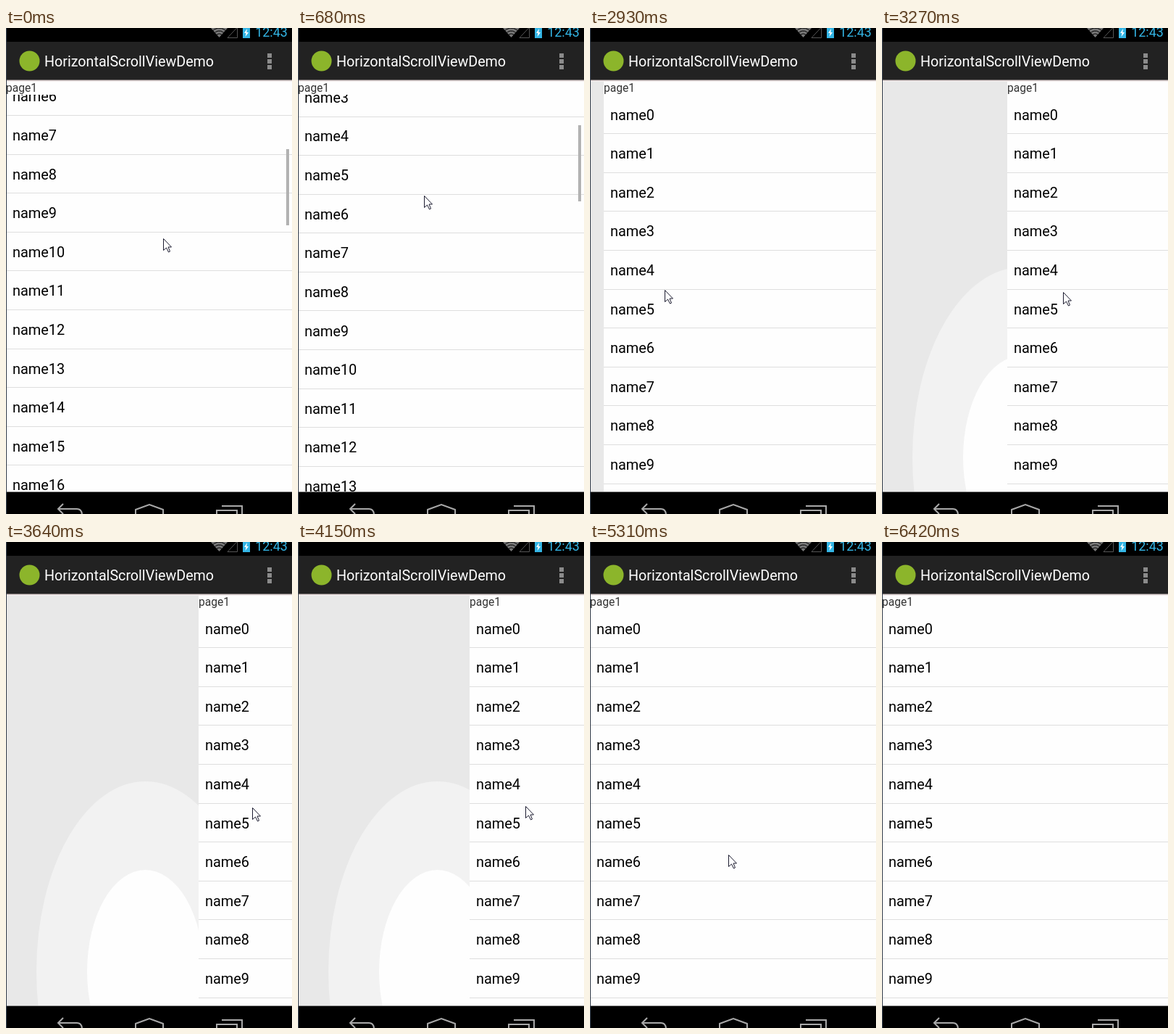
An HTML page with a canvas for the animation above (6.48 s loop, 395x670 px).

```html
<!DOCTYPE html>
<html lang="en">
<head>
<meta charset="utf-8">
<title>HorizontalScrollViewDemo</title>
<style>
html, body { margin: 0; width: 100%; height: 100%; overflow: hidden; background: #000; }
canvas { display: block; }
</style>
</head>
<body>
<canvas id="stage" width="395" height="670"></canvas>
<script>
const ctx = document.getElementById('stage').getContext('2d');
const W = 395, H = 670, LOOP = 6480;
const TOP = 72, LIST = 92, BOTTOM = 639, ROW = 53.6;
const RELEASE = 4120;

// Hand movements: start, end, x, y
const moves = [
  [30, 300, 200, 400], [340, 680, 174, 231],
  [750, 1200, 186, 412], [1350, 1570, 186, 272],
  [1630, 1970, 65, 415], [2000, 2400, 306, 94], [2400, 2640, 75, 360],
  [2880, 3900, 358, 366], [RELEASE, 4400, 148, 355], [4500, 4740, 153, 356],
  [4920, 5010, 161, 379], [5250, 5900, 328, 670]
];

const lerp = (a, b, u) => a + (b - a) * u;
const progress = (t, t0, t1) => Math.min(1, Math.max(0, (t - t0) / (t1 - t0)));
const ease = (t, t0, t1) => 1 - (1 - progress(t, t0, t1)) ** 2;

function pointer(t) {
  let x = 217, y = 290;
  for (const [t0, t1, toX, toY] of moves) {
    const u = ease(t, t0, t1);
    x = lerp(x, toX, u);
    y = lerp(y, toY, u);
  }
  return [x, y];
}

// Two flings take the list back to its first row
function scroll(t) {
  return lerp(lerp(346.8, 184.5, ease(t, 30, 680)), 0, ease(t, 750, 1160));
}

// The page follows the drag, then slides shut on release
function drawer(t) {
  if (t < 2880) return 0;
  const [x] = pointer(Math.min(t, RELEASE));
  const open = Math.max(0, (x - 84) * 1.042);
  return Math.round(lerp(open, 0, ease(t, RELEASE, RELEASE + 352)));
}

function rect(x, y, w, h, color) {
  ctx.fillStyle = color;
  ctx.fillRect(x, y, w, h);
}

function text(str, x, y, size, color) {
  ctx.font = size + 'px Roboto, sans-serif';
  ctx.fillStyle = color;
  ctx.fillText(str, x, y);
}

function shape(d, fill, stroke, width = 1) {
  const p = new Path2D(d);
  if (fill) {
    ctx.fillStyle = fill;
    ctx.fill(p);
  }
  if (stroke) {
    ctx.strokeStyle = stroke;
    ctx.lineWidth = width;
    ctx.stroke(p);
  }
}

function ellipse(x, y, rx, ry, color) {
  ctx.beginPath();
  ctx.ellipse(x, y, rx, ry, 0, 0, 7);
  ctx.fillStyle = color;
  ctx.fill();
}

function clipped(y, draw) {
  ctx.save();
  ctx.beginPath();
  ctx.rect(0, y, W, BOTTOM - y);
  ctx.clip();
  draw();
  ctx.restore();
}

function backdrop() {
  rect(0, TOP, W, BOTTOM - TOP, '#e8e8e8');
  clipped(TOP, () => {
    ellipse(192.5, 592, 150.5, 262, '#f2f2f2');
    ellipse(192.5, 592, 80.5, 140, '#fefefe');
  });
}

function page(x, top) {
  rect(x, TOP, W - x, BOTTOM - TOP, '#fefefe');
  text('page1', x, 88, 15.6, '#333');
  clipped(LIST, () => {
    const first = Math.floor(top / ROW);
    for (let i = first; i < first + 12; i++) {
      const y = LIST + i * ROW - top;
      text('name' + i, x + 9, Math.round(y + 34.6), 19.9, '#000');
      rect(x, Math.round(y + 53.2), W - x, 1, '#dedede');
    }
  });
}

function scrollBar(t, top) {
  ctx.globalAlpha = 1 - progress(t, 1430, 1690);
  rect(387, Math.round(96 + top * 0.2045), 4, 105, '#b2b2b2');
  ctx.globalAlpha = 1;
}

function statusBar() {
  rect(0, 0, W, 19, '#000');
  shape('M294.5 13L283 0H306Z', '#777');
  for (const r of [5, 9, 13]) {
    ctx.beginPath();
    ctx.arc(294.5, 13, r, Math.PI * 1.2, Math.PI * 1.8);
    ctx.strokeStyle = '#000';
    ctx.lineWidth = 1;
    ctx.stroke();
  }
  shape('M306 13.5H319.5V-1Z', null, '#555');
  rect(327, 0, 10, 14, '#33b5e5');
  shape('M333 1L329 7H331.5L330.5 12L335 6H332.3Z', '#fff');
  text('12:43', 344.2, 12, 17.9, '#33b5e5');
}

function actionBar() {
  rect(0, 19, W, 52, '#222');
  ['#6b6666', '#d8cccc', '#f3eeee'].forEach((c, i) => rect(0, 71 + i, W, 1, c));
  ellipse(32.5, 45.5, 14, 14, '#8cb52b');
  text('HorizontalScrollViewDemo', 53, 53, 19.7, '#fff');
  for (const y of [35, 43, 51]) rect(361, y, 6, 6, '#8b8b8b');
}

function navBar() {
  rect(0, BOTTOM, W, 1, '#8a8a8a');
  rect(0, BOTTOM + 1, W, 30, '#000');
  const icons = [
    'M79 656L72 663L79 670M72 663H98Q105 663 105 672',
    'M179 672V664L198 657L217 664V672',
    'M291 672V665H319V672M298 659H326V672'
  ];
  for (const d of icons) shape(d, null, '#a9a9a9', 2);
}

function arrow([x, y]) {
  ctx.save();
  ctx.translate(Math.round(x) + 0.5, Math.round(y) + 0.5);
  shape('M0 0V16L4 12.5L7 18.5L9 17.5L6.5 11.5H11Z', '#fff', '#1c1c30');
  ctx.restore();
}

function draw(t) {
  const top = scroll(t);
  backdrop();
  page(drawer(t), top);
  scrollBar(t, top);
  statusBar();
  actionBar();
  navBar();
  rect(0, 0, 1, H, '#323c4a');
  arrow(pointer(t));
}

const start = performance.now();
function tick() {
  draw((performance.now() - start) % LOOP);
  requestAnimationFrame(tick);
}
tick();
</script>
</body>
</html>
```
